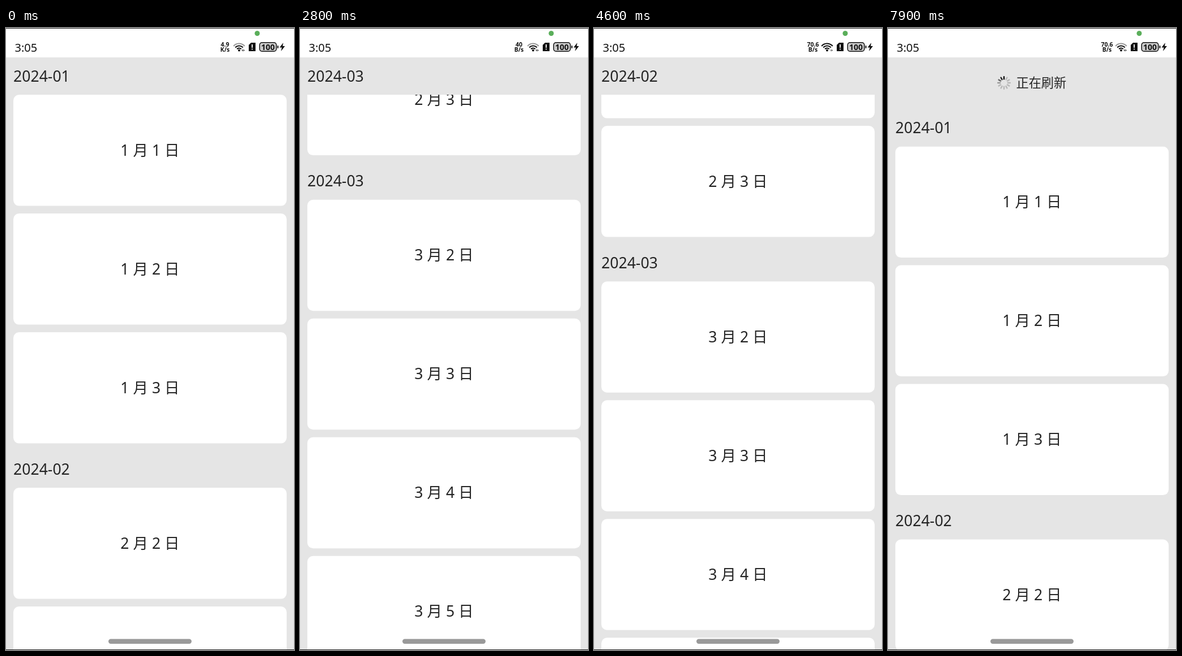
An HTML page with a canvas for the animation above (8 s loop, 509x1100 px).

```html
<!DOCTYPE html>
<html lang="zh-CN">
<head>
<meta charset="utf-8">
<title>List</title>
<style>
html, body { margin: 0; width: 100%; height: 100%; overflow: hidden; background: #fff; }
canvas { display: block; width: 509px; height: 1100px; }
</style>
</head>
<body>
<canvas id="stage" width="509" height="1100"></canvas>
<script>
const ctx = document.getElementById('stage').getContext('2d');
const W = 509, H = 1100, LOOP = 8000, STEP = 100;
const FONT = '"Noto Sans", "Noto Sans CJK SC", sans-serif';
const BG = '#e5e5e5', INK = '#242424';
const BAR_H = 52, STICKY_H = 66, CARD_H = 196.6, PITCH = 210;
const REFRESH_H = 91.5, MAX_SCROLL = 1549.5;

const sections = [
  { title: '2024-01', month: 1, top: 118, days: [1, 2, 3] },
  { title: '2024-02', month: 2, top: 813, days: [2, 3] },
  { title: '2024-03', month: 3, top: 1298.2, days: [2, 3, 4, 5, 6, 7] }
];

// [time, scroll offset]; negative offsets are the pull to refresh
const scrollKeys = [
  [1500, 0], [1600, 56], [1800, 235], [2000, 380], [2300, 554],
  [2500, 715], [2800, 994.5], [3000, 1205], [3200, 1405], [3300, 1490],
  [3400, 1535], [3500, MAX_SCROLL], [4100, MAX_SCROLL], [4200, 1518.5],
  [4300, 1415], [4500, 1035], [4700, 665], [4900, 370], [5000, 248],
  [5100, 145], [5200, 60], [5300, 0], [5800, 0], [5900, -22],
  [6200, -112], [6300, -118], [6500, -REFRESH_H]
];

function scrollAt(t) {
  const i = scrollKeys.findIndex(key => key[0] > t);
  if (i === 0) return 0;
  if (i < 0) return scrollKeys[scrollKeys.length - 1][1];
  const [t0, a] = scrollKeys[i - 1], [t1, b] = scrollKeys[i];
  return a + (b - a) * (t - t0) / (t1 - t0);
}

function rect(x, y, w, h, color) {
  ctx.fillStyle = color;
  ctx.fillRect(x, y, w, h);
}

function roundRect(x, y, w, h, r, color) {
  ctx.fillStyle = color;
  ctx.beginPath();
  ctx.roundRect(x, y, w, h, r);
  ctx.fill();
}

function polygon(points, color) {
  ctx.fillStyle = color;
  ctx.beginPath();
  points.forEach(([x, y]) => ctx.lineTo(x, y));
  ctx.fill();
}

function text(str, x, y, size, { weight = 400, align = 'left', color = INK } = {}) {
  ctx.font = `${weight} ${size}px ${FONT}`;
  ctx.textAlign = align;
  ctx.fillStyle = color;
  ctx.fillText(str, x, y);
}

function drawSections(scroll) {
  for (const { title, month, top, days } of sections) {
    text(title, 13, top - 23.5 - scroll, 26.6);
    days.forEach((day, i) => {
      const y = top + i * PITCH - scroll;
      if (y > H || y + CARD_H < BAR_H) return;
      roundRect(13, y, 483, CARD_H, 10, '#fff');
      text(`${month} 月 ${day} 日`, 254.5, y + 107.5, 26.6, { align: 'center' });
    });
  }
  text('没有更多数据了', 186, 2612 - scroll, 21);
}

function drawSticky(scroll) {
  const y = BAR_H + Math.max(0, -scroll);
  const current = sections.filter((s, i) => !i || s.top - 33 - scroll < 380).pop();
  rect(0, y, W, STICKY_H, BG);
  text(current.title, 13, y + 42.5, 26.6);
}

function drawRefresh(scroll, t) {
  if (scroll >= 0) return;
  const y = 97 - REFRESH_H - scroll;
  const head = Math.round((t - 7900) * 12 / 1000);
  ctx.lineWidth = 2.4;
  ctx.lineCap = 'round';
  for (let i = 0; i < 12; i++) {
    const age = ((head - i) % 12 + 12) % 12;
    const angle = i * Math.PI / 6 - Math.PI / 2;
    const dx = Math.cos(angle), dy = Math.sin(angle);
    ctx.strokeStyle = ['#111', '#222', '#666', '#999'][age] || '#b8b8b8';
    ctx.beginPath();
    ctx.moveTo(205 + dx * 6.8, y + dy * 6.8);
    ctx.lineTo(205 + dx * 10.8, y + dy * 10.8);
    ctx.stroke();
  }
  text('正在刷新', 226.5, y + 8.2, 22.2);
}

function drawWifi(strong) {
  ctx.lineCap = 'butt';
  ctx.lineWidth = 2.2;
  [13, 9, 5].forEach((r, i) => {
    ctx.strokeStyle = i || strong ? '#111' : '#999';
    ctx.beginPath();
    ctx.arc(412, 40.5, r, -Math.PI * 0.77, -Math.PI * 0.23);
    ctx.stroke();
  });
  ctx.fillStyle = '#111';
  ctx.beginPath();
  ctx.arc(412, 39.5, 2, 0, 7);
  ctx.fill();
  polygon([[416.5, 39.5], [418.5, 37.5], [418.5, 41.5]], strong ? '#999' : '#222');
  polygon([[421.7, 39.5], [419.7, 37.5], [419.7, 41.5]], '#222');
}

function drawStatusBar(t) {
  rect(0, 0, W, BAR_H, '#fff');
  ctx.fillStyle = '#5aae5a';
  ctx.beginPath();
  ctx.arc(444, 9.5, 4.5, 0, 7);
  ctx.fill();
  text('3:05', 15.5, 42, 20, { weight: 500, color: '#111' });

  const [rate, unit] = t < 1300 ? ['4.9', 'K/s'] : t < 4600 ? ['40', 'B/s'] : ['70.6', 'B/s'];
  const small = { weight: 600, align: 'center', color: '#111' };
  text(rate, 387, 33, 10.5, small);
  text(unit, 387, 42.3, 10.5, small);
  drawWifi(t >= 3800 && t < 5500);

  polygon([[433, 26], [441, 26], [441, 41], [429, 41], [429, 30]], '#111');
  rect(434.2, 29, 1.8, 6, '#fff');
  rect(434.2, 36.5, 1.8, 1.8, '#fff');

  roundRect(447.5, 25, 31, 17, 5, '#111');
  roundRect(449, 26.5, 28, 14, 3.5, '#ccc');
  text('100', 463, 38.6, 14, { weight: 700, align: 'center', color: '#111' });
  roundRect(479.5, 31, 2, 5, 1, '#111');
  polygon([[490, 26], [483.5, 34.5], [487.5, 34.5], [486, 41], [493, 32], [489, 32]], '#111');
}

function draw(t) {
  const scroll = scrollAt(t);
  rect(0, 0, W, H, BG);
  drawSections(scroll);
  drawSticky(scroll);
  drawRefresh(scroll, t);
  drawStatusBar(t);
  roundRect(181, 1080.5, 147, 8.5, 4.2, 'rgba(0,0,0,0.4)');
  rect(0, 0, W, 1, '#222');
  rect(0, H - 1, W, 1, '#222');
}

const start = performance.now();
function tick() {
  const t = (performance.now() - start) % LOOP;
  draw(Math.floor(t / STEP) * STEP);
  requestAnimationFrame(tick);
}
tick();
</script>
</body>
</html>
```
